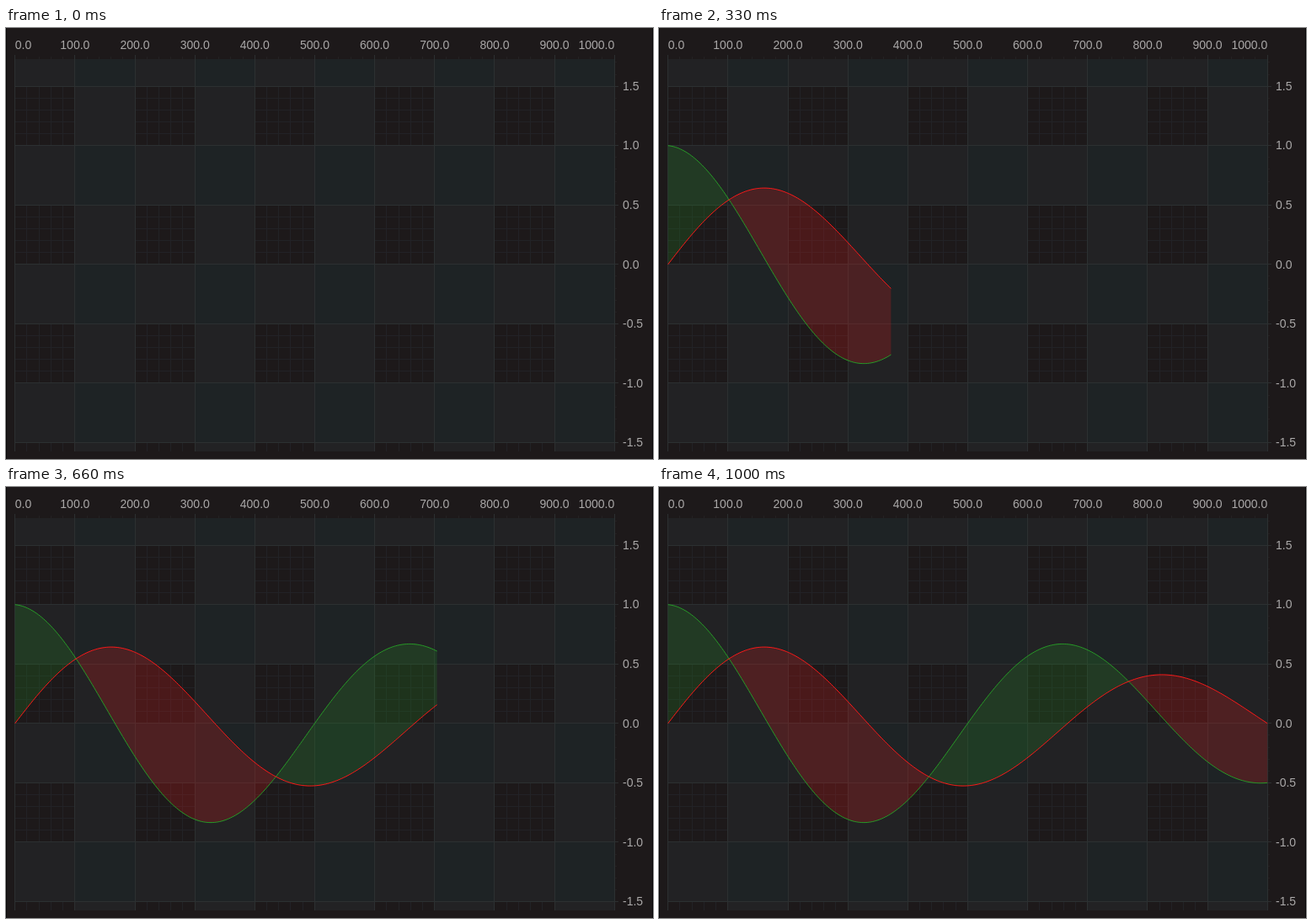
Recreate the animation shown at these times as an HTML page with a canvas. Size 768 px wide and 512 px high, loop 2200 ms.

```html
<!DOCTYPE html>
<html lang="en">
<head>
<meta charset="utf-8">
<title>Band chart</title>
<style>
  html, body { margin: 0; width: 100%; height: 100%; overflow: hidden; background: #1d191a; }
  canvas { display: block; }
</style>
</head>
<body>
<canvas id="chart" width="768" height="512"></canvas>
<script>
const ctx = document.getElementById('chart').getContext('2d');
const LOOP = 2200;
const plot = { left: 10, top: 37, right: 722, bottom: 503 };

// Time in ms and how far along the x axis the curves are drawn.
const steps = [
  [0, 0], [130, 172], [200, 240], [260, 306], [330, 372], [400, 440], [460, 508], [530, 576],
  [600, 640], [660, 704], [730, 772], [800, 842], [860, 911], [930, 978], [1000, 1000]
];

const toX = v => 10.7 + v * 0.7115;
const toY = v => 280.8 - v * 141.1;

const damping = v => 1 - v / 2000;
const angle = v => 3 * Math.PI * v / 1000;
const green = v => Math.cos(angle(v)) * damping(v);
const red = v => 0.7 * Math.sin(angle(v)) * damping(v);
const firstCrossing = Math.atan(1 / 0.7) / (3 * Math.PI) * 1000;

function rect(color, x, y, w, h) {
  ctx.fillStyle = color;
  ctx.fillRect(x, y, w, h);
}

const vLine = (color, x, top, bottom) => rect(color, Math.floor(x), top, 1, bottom - top);
const hLine = (color, y, left, right) => rect(color, left, Math.floor(y), right - left, 1);

function drawMinorGrid() {
  for (let v = 0; v <= 1000; v += 20) {
    vLine('#222226', toX(v), plot.top, plot.bottom);
    vLine('#242122', toX(v), plot.top - 3, plot.top);
  }
  for (let i = -15; i <= 17; i++) {
    const y = toY(i / 10);
    hLine('#222226', y, plot.left, plot.right);
    hLine('#242122', y, plot.right, plot.right + 3);
  }
}

function drawBands() {
  for (let row = -4; row < 4; row++) {
    const top = Math.max(plot.top, Math.floor(toY((row + 1) / 2)));
    const bottom = Math.min(plot.bottom, Math.floor(toY(row / 2)));
    const rowBand = row % 2 !== 0;
    for (let col = 0; col < 10; col++) {
      const colBand = col % 2 !== 0;
      if (!colBand && rowBand === (row === -5)) {
        if (!isBandRow(row)) continue;
      }
      const both = colBand && isBandRow(row);
      const left = Math.floor(toX(col * 100));
      const right = Math.floor(toX(col * 100 + 100));
      rect(both ? '#1e2325' : '#222224', left, top, right - left, bottom - top);
    }
  }
}

function isBandRow(row) {
  return Math.abs(row) % 2 === 1;
}

function drawAxes() {
  ctx.font = '14px "Liberation Sans", Arial, sans-serif';
  ctx.textBaseline = 'alphabetic';
  for (let v = 0; v <= 1000; v += 100) {
    const x = toX(v);
    vLine('#2c3031', x, plot.top - 5, plot.bottom);
    ctx.fillStyle = '#aaa8a8';
    ctx.textAlign = v === 0 ? 'left' : v === 1000 ? 'right' : 'center';
    ctx.fillText(v.toFixed(1), x, 25);
  }
  ctx.textAlign = 'left';
  for (let i = -3; i <= 3; i++) {
    const y = toY(i / 2);
    hLine('#2c3031', y, plot.left, plot.right + 5);
    ctx.fillStyle = '#aaa8a8';
    ctx.fillText((i / 2).toFixed(1), 732, Math.round(y - 0.3) + 5);
  }
}

function trace(curve, from, to) {
  const count = Math.max(1, Math.ceil(Math.abs(to - from) / 3));
  for (let i = 0; i <= count; i++) {
    const v = from + (to - from) * i / count;
    ctx.lineTo(toX(v), toY(curve(v)));
  }
}

function fillBetween(from, to, color) {
  ctx.beginPath();
  trace(green, from, to);
  trace(red, to, from);
  ctx.closePath();
  ctx.fillStyle = color;
  ctx.fill();
}

function strokeCurve(curve, end, color) {
  ctx.beginPath();
  trace(curve, 0, end);
  ctx.strokeStyle = color;
  ctx.lineWidth = 1;
  ctx.stroke();
}

function drawSeries(end) {
  let from = 0;
  for (let k = 0; from < end; k++) {
    const to = Math.min(end, firstCrossing + k * 1000 / 3);
    fillBetween(from, to, k % 2 ? '#ff191933' : '#279b2733');
    from = to;
  }
  strokeCurve(green, end, '#279b27');
  strokeCurve(red, end, '#ff1919');
}

function draw(time) {
  rect('#1d191a', 0, 0, 768, 512);
  drawMinorGrid();
  drawBands();
  drawAxes();
  rect('#080708', 0, 0, 1, 512);
  rect('#080708', 767, 0, 1, 512);
  const end = steps.findLast(([start]) => start <= time)[1];
  if (end > 0) drawSeries(end);
}

function tick() {
  draw(performance.now() % LOOP);
  requestAnimationFrame(tick);
}
tick();
</script>
</body>
</html>
```
